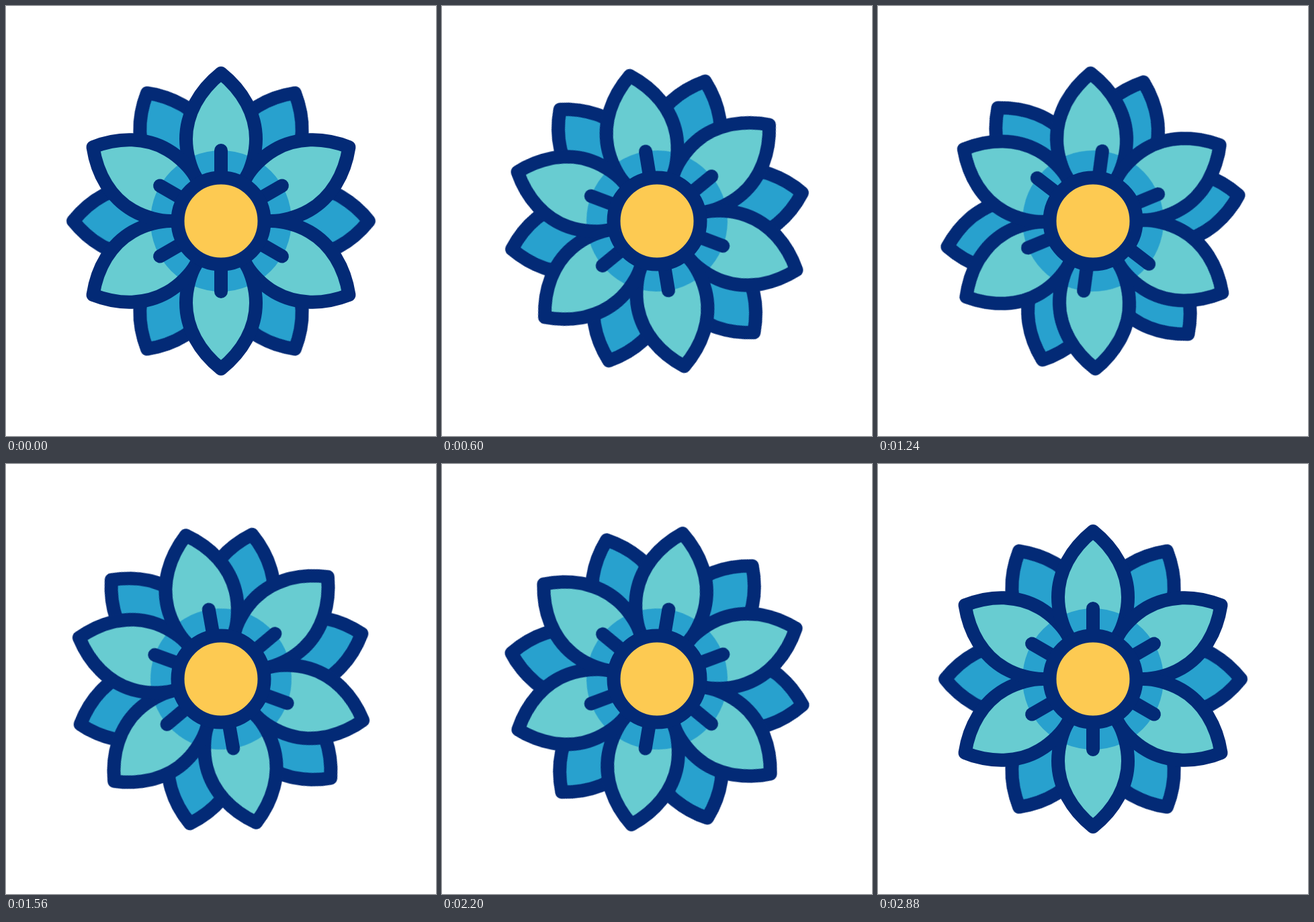
These frames come from a looping animation (640x640 px, 3000 ms). An HTML page without scripts:

```html
<!DOCTYPE html>
<html lang="en">
<head>
<meta charset="utf-8">
<title>Spinning flower</title>
<style>
  :root { --navy: #032a76; --teal: #68ccd1; --blue: #28a1ce; --yellow: #fdca52; }
  html, body { margin: 0; width: 100%; height: 100%; overflow: hidden; background: #fff; }
  svg { display: block; width: 100%; height: 100%; }

  .outline { fill: none; stroke: var(--navy); stroke-width: 20; stroke-linecap: round; stroke-linejoin: round; }
  .teal { fill: var(--teal); }
  .blue { fill: var(--blue); }
  .core { fill: var(--yellow); stroke: var(--navy); stroke-width: 20; }

  /* Wind up, half turn with overshoot, settle; outer layers trail behind. */
  .layer { animation: spin 3s infinite both; }
  .front { animation-delay: 42ms; }
  .back { animation-delay: 83ms; }
  @keyframes spin {
    0%, 4% { transform: rotate(0deg); animation-timing-function: cubic-bezier(.333, 0, .667, 1); }
    17.333% { transform: rotate(-11deg); animation-timing-function: cubic-bezier(.333, 0, .262, 1); }
    70.667% { transform: rotate(190.1deg); animation-timing-function: cubic-bezier(.25, 0, .667, 1); }
    93.333%, 100% { transform: rotate(180deg); }
  }
</style>
</head>
<body>
<svg viewBox="0 0 640 640">
  <defs>
    <path id="petal" d="M0 0L-37.5-65C-45-78-52-100-52-122C-52-159-32.5-194 0-220C32.5-194 52-159 52-122C52-100 45-78 37.5-65Z"/>
    <g id="petals">
      <use href="#petal"/>
      <use href="#petal" transform="rotate(60)"/>
      <use href="#petal" transform="rotate(120)"/>
      <use href="#petal" transform="rotate(180)"/>
      <use href="#petal" transform="rotate(240)"/>
      <use href="#petal" transform="rotate(300)"/>
    </g>
    <path id="stamens" d="M0-105V105"/>
  </defs>

  <g transform="translate(320 320)">
    <g class="layer back">
      <g transform="rotate(30)">
        <use href="#petals" class="blue"/>
        <use href="#petals" class="outline"/>
      </g>
    </g>
    <g class="layer front">
      <use href="#petals" class="teal"/>
      <circle r="105" class="blue"/>
      <use href="#petals" class="outline"/>
    </g>
    <g class="layer outline">
      <use href="#stamens"/>
      <use href="#stamens" transform="rotate(60)"/>
      <use href="#stamens" transform="rotate(120)"/>
    </g>
    <circle r="64.5" class="core"/>
  </g>
</svg>
</body>
</html>
```
